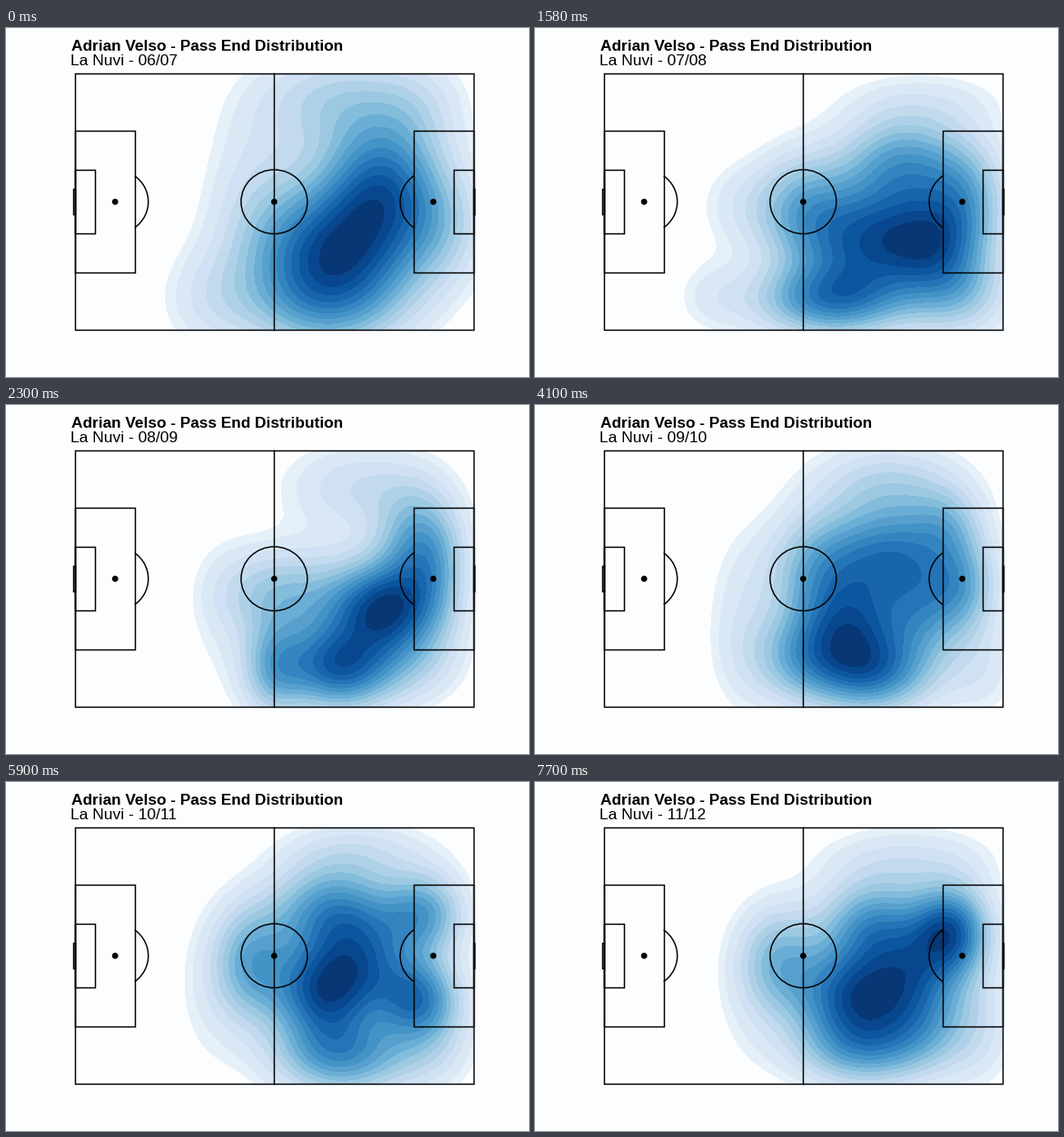
A matplotlib script for the animation above (8 s loop, 576 by 384 pixels).

```python
import numpy as np
import matplotlib.pyplot as plt
from matplotlib.animation import FuncAnimation
from matplotlib.patches import Arc, Circle, Ellipse, Rectangle

WIDTH, HEIGHT = 576, 384
LEFT, RIGHT, TOP, BOTTOM = 76, 514.8, 50, 332
MID_X, MID_Y = 295.4, 191.2
CIRCLE_W, CIRCLE_H = 73, 70.5
BANDS = 17
STEP_MS, LOOP_MS, SEASON_MS, LEAD_MS = 100, 8000, 1800, 1300
PAPER = "#fbfdff"

# Clusters of passes per season: centre x, y, spread x, y, strength.
SEASONS = {
    "06/07": [(360, 250, 66, 55, 12), (415, 170, 45, 50, 8.5),
              (360, 80, 60, 40, 4), (345, 310, 60, 35, 3),
              (225, 300, 40, 40, 2), (480, 215, 35, 45, 3),
              (455, 85, 40, 40, 2), (272, 160, 40, 60, 1.8)],
    "07/08": [(365, 235, 48, 42, 9), (435, 235, 38, 38, 7),
              (405, 150, 48, 38, 7), (325, 300, 58, 28, 8),
              (295, 200, 38, 45, 5.5), (465, 290, 40, 35, 4.5),
              (475, 190, 32, 45, 5), (430, 80, 70, 25, 1.5),
              (195, 295, 30, 30, 1.5), (225, 195, 35, 35, 1.6)],
    "08/09": [(418, 222, 38, 34, 10), (365, 291, 40, 32, 9),
              (455, 155, 32, 42, 6.5), (295, 290, 25, 38, 5.5),
              (290, 205, 42, 35, 4), (390, 90, 60, 35, 3),
              (440, 280, 42, 35, 3.5), (475, 200, 25, 45, 2.5),
              (355, 225, 40, 45, 3.5), (235, 240, 28, 70, 1)],
    "09/10": [(350, 250, 42, 42, 9), (395, 165, 48, 40, 8.5),
              (310, 180, 40, 45, 5.5), (375, 298, 45, 30, 6.5),
              (470, 200, 28, 38, 5.5), (390, 85, 60, 32, 3.5),
              (455, 130, 28, 28, 3), (290, 280, 38, 35, 5),
              (225, 240, 28, 70, 1.8), (490, 290, 30, 40, 2),
              (425, 235, 30, 40, 4.5)],
    "10/11": [(348, 230, 38, 36, 9), (360, 145, 48, 38, 7.5),
              (270, 200, 30, 45, 5.5), (370, 300, 52, 32, 7),
              (455, 238, 32, 32, 7.5), (460, 145, 32, 32, 6),
              (400, 200, 35, 38, 5), (390, 75, 60, 25, 2),
              (222, 235, 32, 70, 1), (470, 295, 35, 35, 1.8)],
    "11/12": [(354, 235, 46, 36, 9), (375, 160, 42, 36, 7),
              (458, 165, 30, 35, 9), (360, 294, 52, 30, 5.5),
              (270, 195, 32, 42, 4.5), (430, 255, 38, 40, 4.5),
              (410, 85, 70, 28, 2), (235, 235, 32, 65, 0.9),
              (490, 270, 30, 50, 1.6), (415, 205, 30, 30, 2.5)],
}


def density(clusters, x, y):
    """Sum of Gaussian clusters, scaled so the peak fills the top band."""
    total = sum(h * np.exp(-((x - cx) / sx) ** 2 / 2 - ((y - cy) / sy) ** 2 / 2)
                for cx, cy, sx, sy, h in clusters)
    return total * BANDS / total.max()


fig = plt.figure(figsize=(6, 4), dpi=96, facecolor=PAPER)
ax = fig.add_axes([0, 0, 1, 1])
ax.set_xlim(0, WIDTH)
ax.set_ylim(HEIGHT, 0)
ax.axis("off")

xs, ys = np.meshgrid(np.linspace(LEFT, RIGHT, 180), np.linspace(TOP, BOTTOM, 120))
levels = np.arange(1.0, BANDS + 1)
levels[0] = 1.4
levels[-1] = BANDS + 1
shades = plt.get_cmap("Blues")((np.arange(1, BANDS) + 0.5) / BANDS)
heatmaps = [
    ax.contourf(xs, ys, density(clusters, xs, ys), levels, colors=shades, zorder=1)
    for clusters in SEASONS.values()
]

LINE = dict(lw=1.1, color="black", zorder=3)


def box(x0, y0, x1, y1):
    ax.add_patch(Rectangle((x0, y0), x1 - x0, y1 - y0, fill=False, **LINE))


def spot(x):
    ax.add_patch(Circle((x, MID_Y), 3.4, color="black", lw=0, zorder=3))


box(LEFT, TOP, RIGHT, BOTTOM)
for goal_x, side, depth in ((LEFT, 1, 2), (RIGHT, -1, 1)):
    box(goal_x, 113, goal_x + 66 * side, 269)
    box(goal_x, 156, goal_x + 22 * side, 226)
    box(goal_x, 177, goal_x - depth * side, 205)
    spot_x = goal_x + 44.2 * side
    spot(spot_x)
    facing = 0 if side > 0 else 180
    ax.add_patch(Arc((spot_x, MID_Y), CIRCLE_W, CIRCLE_H,
                     theta1=facing - 53, theta2=facing + 53, **LINE))
ax.plot([MID_X, MID_X], [TOP, BOTTOM], **LINE)
ax.add_patch(Ellipse((MID_X, MID_Y), CIRCLE_W, CIRCLE_H, fill=False, **LINE))
spot(MID_X)

ax.text(72, 25, "Adrian Velso - Pass End Distribution", fontsize=12.95,
        family="Liberation Sans", weight="bold", va="baseline")
subtitle = ax.text(71, 41, "", fontsize=13.05, family="Liberation Sans",
                   va="baseline")
names = list(SEASONS)


def update(frame):
    current = (frame * STEP_MS + LEAD_MS) // SEASON_MS
    for i, heat in enumerate(heatmaps):
        heat.set_visible(i == current)
    subtitle.set_text(f"La Nuvi - {names[current]}")
    return [*heatmaps, subtitle]


anim = FuncAnimation(fig, update, frames=LOOP_MS // STEP_MS, interval=STEP_MS,
                     repeat=True, repeat_delay=0)
plt.show()
```
